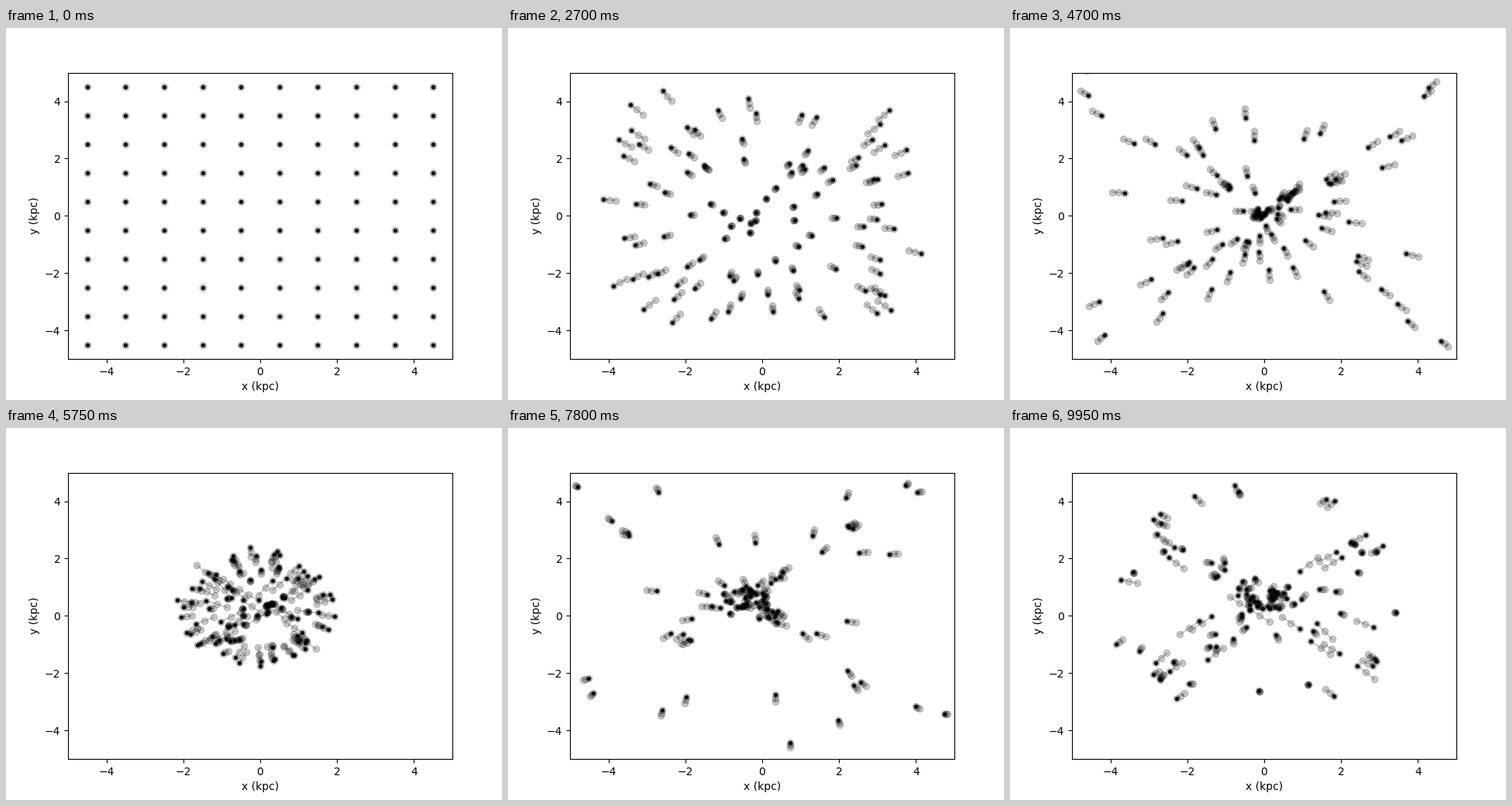
Recreate the animation shown at these times as a matplotlib script. Size 640 by 480 pixels, loop 10 s.

```python
import numpy as np
import matplotlib.pyplot as plt
from matplotlib.animation import FuncAnimation

FRAMES, TAIL = 200, 3
PULL = 1e-4     # attraction between any two stars, the same at every distance
SCATTER = 36    # time of the first core passage, when close encounters deflect stars
KICK = 0.025    # spread of those deflections, kpc per frame


def gravity(pos):
    """Sum of unit vectors towards all other stars."""
    gap = pos[None] - pos[:, None]
    dist = np.linalg.norm(gap, axis=2, keepdims=True) + 1e-9
    return PULL * (gap / dist).sum(axis=1)


def simulate():
    """Cold collapse of a square grid of stars, by leapfrog steps."""
    rng = np.random.default_rng(4)
    side = np.arange(10) - 4.5
    pos = np.stack(np.meshgrid(side, side), axis=-1).reshape(-1, 2)
    vel = np.zeros_like(pos)
    acc = gravity(pos)
    track = [pos]
    for t in range(1, FRAMES):
        vel = vel + acc / 2
        pos = pos + vel
        acc = gravity(pos)
        vel = vel + acc / 2
        if t == SCATTER:
            vel = vel + rng.normal(0, KICK, vel.shape)
        track.append(pos)
    return np.array(track)


track = simulate()

fig, ax = plt.subplots(figsize=(6.4, 4.8), dpi=100)
ax.set(xlim=(-5, 5), ylim=(-5, 5), xlabel="x (kpc)", ylabel="y (kpc)")
trails, = ax.plot([], [], "ko-", alpha=0.2)
stars, = ax.plot([], [], "k.", alpha=0.87)


def draw(i):
    past = track[max(0, i - TAIL + 1):i + 1]
    breaks = np.full_like(past[:1], np.nan)  # keeps the trails apart
    path = np.concatenate([past, breaks]).swapaxes(0, 1).reshape(-1, 2)
    trails.set_data(*path.T)
    stars.set_data(*track[i].T)
    return trails, stars


anim = FuncAnimation(fig, draw, frames=FRAMES, interval=50, repeat=True)
plt.show()
```
